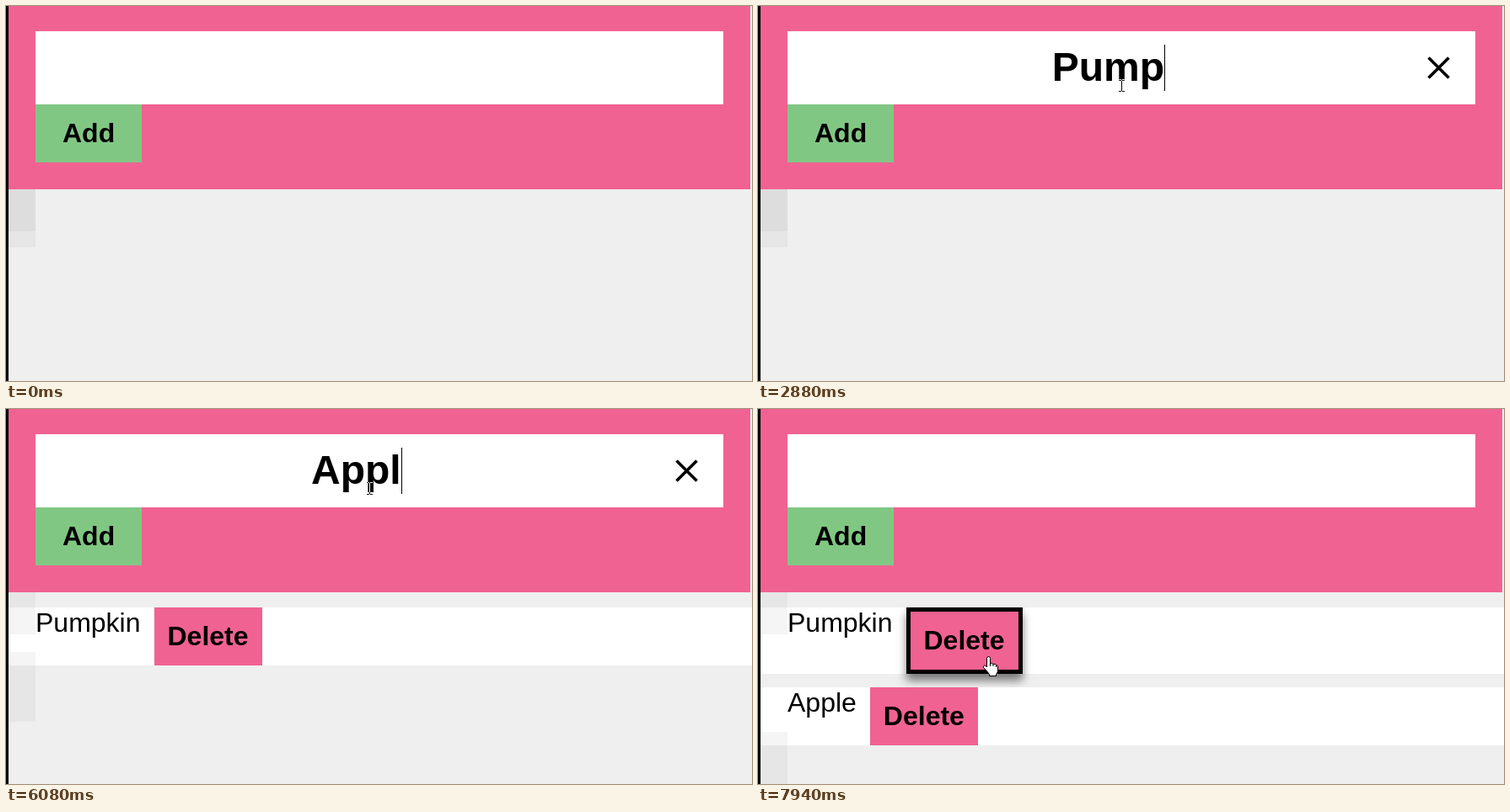
Write an HTML page with a canvas that moves like this. It is 885 px wide and 446 px high and loops after 8 s.

```html
<!DOCTYPE html>
<html lang="en">
<head>
<meta charset="utf-8">
<style>
  html, body { margin: 0; height: 100%; overflow: hidden; background: #efefef; }
  canvas { display: block; }
</style>
</head>
<body>
<canvas id="stage" width="885" height="446"></canvas>
<script>
const ctx = document.getElementById('stage').getContext('2d');
const LOOP = 8000, PINK = '#f06292', GREEN = '#81c784';
const FONT = '"Liberation Sans", Arial, sans-serif';

// [time, text in the search field]
const typing = [
  [0, ''], [1800, 'P'], [2040, 'Pu'], [2420, 'Pum'], [2880, 'Pump'], [3190, 'Pumpk'],
  [3330, 'Pumpki'], [3410, 'Pumpkin'], [3870, ''], [5550, 'A'], [5780, 'Ap'],
  [5920, 'App'], [6080, 'Appl'], [6220, 'Apple'], [6670, '']
];
// [time, caret opacity]
const caret = [
  [0, 0], [880, 1], [1340, .5], [1420, 0], [1800, 1], [2800, .5], [2880, 1], [3790, .5],
  [3870, 0], [4640, 1], [5020, .65], [5100, .3], [5180, 0], [5550, 1], [6610, .5], [6670, 0]
];
const items = [[3870, 'Pumpkin'], [6670, 'Apple']];

const at = (keys, t) => keys.findLast(([start]) => start <= t)[1];

function rect(x, y, w, h, color) {
  ctx.fillStyle = color;
  ctx.fillRect(x, y, w, h);
}

function text(str, x, y, size, weight = 'bold') {
  ctx.font = `${weight} ${size}px ${FONT}`;
  ctx.fillStyle = '#000';
  ctx.fillText(str, x, y);
}

function textWidth(str, size, weight = 'bold') {
  ctx.font = `${weight} ${size}px ${FONT}`;
  return ctx.measureText(str).width;
}

// Pointer moves in ten equal time steps after its first position
function glide(t, start, end, from, to) {
  const k = Math.min(1, Math.floor((t - start) / (end - start) * 10 + 1e-6) / 10);
  const p = k * k * (3 - 2 * k);
  return from.map((v, i) => Math.round(v + (to[i] - v) * p));
}

function pointerAt(t) {
  if (t < 60) return null;
  if (t < 7210) return glide(t, 60, 800, [659, 357], [431, 94]);
  return glide(t, 7137, 7940, [431, 94], [273, 295]);
}

function drawField(t) {
  rect(35, 30, 816, 87, '#fff');
  const str = at(typing, t);
  const w = textWidth(str, 48);
  const center = str ? 415.3 : 443;
  if (str) {
    text(str, center - w / 2, 89, 48);
    ctx.strokeStyle = '#000';
    ctx.lineWidth = 3.6;
    ctx.stroke(new Path2D('M795.5 61.5l24 24m0-24l-24 24'));
  }
  rect(Math.round(center + w / 2), 46, 1, 55, `rgba(0,0,0,${at(caret, t)})`);
}

function drawItem(name, y, hover) {
  const edge = hover ? 5 : 0, height = 69 + 2 * edge;
  rect(3, y, 882, height, '#fff');
  text(name, 35, y + 29, 32, 'normal');
  const left = 51 + textWidth(name, 32, 'normal');
  const x = Math.round(left);
  if (hover) {
    ctx.save();
    ctx.shadowColor = 'rgba(0,0,0,.5)';
    ctx.shadowBlur = 10;
    ctx.shadowOffsetY = 8;
    rect(x, y, 138, height, '#000');
    ctx.restore();
  }
  rect(x + edge, y + edge, 128, 69, PINK);
  text('Delete', left + 16 + edge, y + 45 + edge, 32);
  return height;
}

function outlined(path, x, y) {
  ctx.save();
  ctx.translate(x, y);
  const shape = new Path2D(path);
  ctx.fillStyle = '#fff';
  ctx.strokeStyle = '#000';
  ctx.lineWidth = 1;
  ctx.lineJoin = 'round';
  ctx.fill(shape);
  ctx.stroke(shape);
  ctx.restore();
}

function drawPointer([x, y], hover) {
  if (hover) {
    outlined('M-1.5 12V1.5Q-1.5-.5 .5-.5T2.5 1.5V7.5Q5 6.500 6 8.500 8.500 7.500 9.500 9.500 ' +
      '11.500 9 11.500 12V16Q11.500 18.500 9.500 20.500V22.500H1.500V20.500L-2.500 15.500-5.500 12.500' +
      'Q-6 10.500-4.500 10-3 10-1.500 12Z', x, y);
    ctx.strokeStyle = '#000';
    ctx.lineWidth = 1;
    ctx.stroke(new Path2D(`M${x + 2.5} ${y + 7}v4m3.500-3v3m3.500-2v3`));
  } else if (x > 35 && x < 851 && y > 30 && y < 117) {
    // The text cursor inverts what lies below it
    ctx.globalCompositeOperation = 'difference';
    rect(x, y - 6, 1, 13, '#fff');
    for (const row of [y - 7, y + 7]) {
      rect(x - 3, row, 3, 1, '#fff');
      rect(x + 1, row, 3, 1, '#fff');
    }
    ctx.globalCompositeOperation = 'source-over';
  } else {
    outlined('M.5.5V16.500L4 13 6.500 18.500 9 17.500 6.500 12H11.500Z', x, y);
  }
}

function draw(t) {
  const pointer = pointerAt(t);
  const hover = t > 7210 && pointer[0] < 304 && pointer[1] > 236;

  rect(0, 0, 885, 446, '#efefef');
  rect(3, 0, 880, 218, PINK);
  drawField(t);
  rect(35, 117, 126, 69, GREEN);
  text('Add', 67, 162, 32);

  const rows = items.filter(([start]) => start <= t);
  let y = 236;
  rows.forEach(([, name], i) => {
    y += drawItem(name, y, hover && i === 0) + 16;
  });

  const shade = 'rgba(0,0,0,.04)';
  rect(3, 218, 32, 50, shade);
  if (rows.length) rect(3, y - 32, 32, 83, shade);
  else rect(3, 218, 32, 69, shade);
  rect(0, 0, 3, 446, '#000');

  if (pointer) drawPointer(pointer, hover);
}

function tick() {
  draw(performance.now() % LOOP);
  requestAnimationFrame(tick);
}
tick();
</script>
</body>
</html>
```
